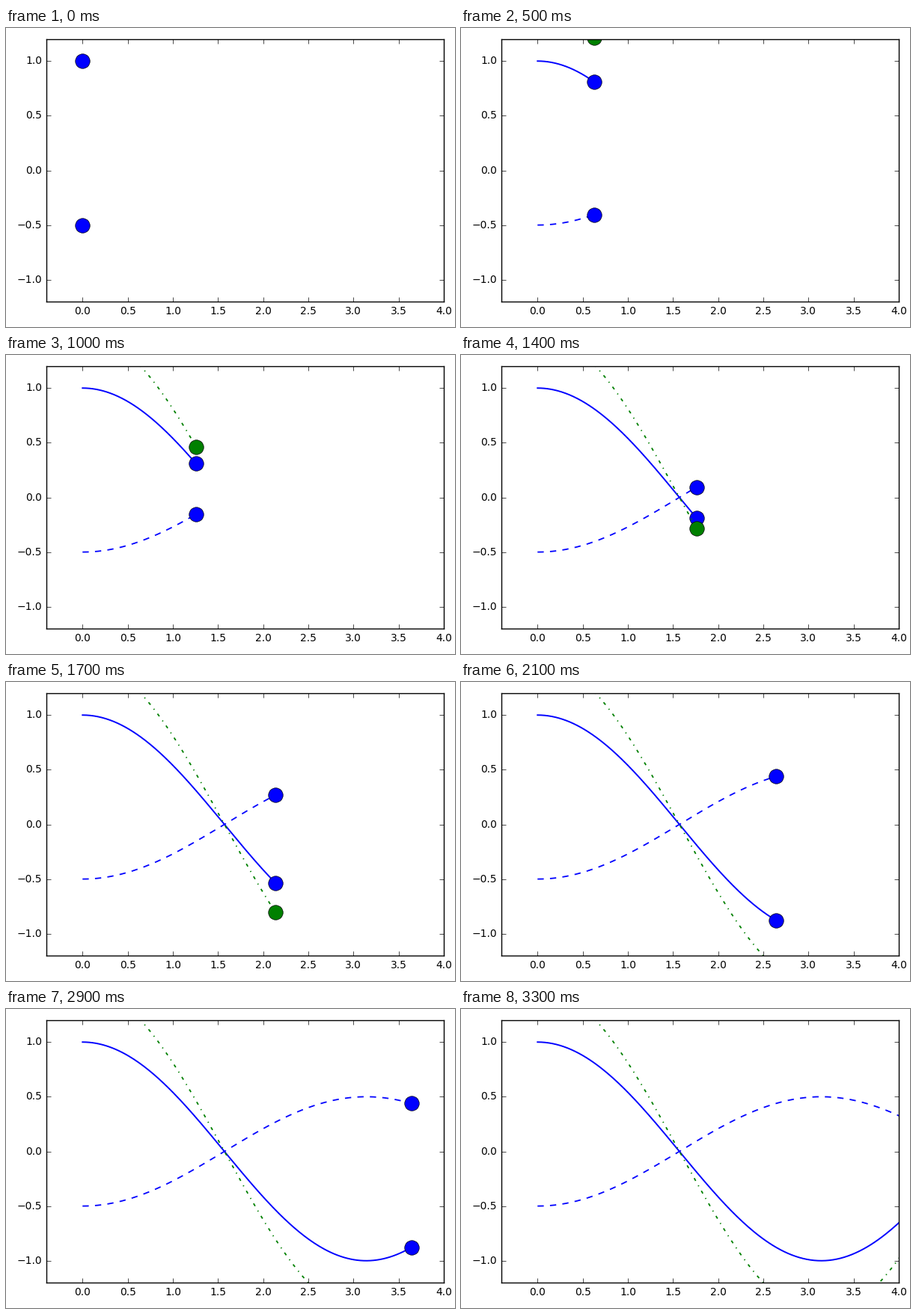
Animation of 600 by 400 pixels, one loop 5.1 s. Source, as a matplotlib script:

```python
import numpy as np
import matplotlib.pyplot as plt
from matplotlib.animation import FuncAnimation

plt.style.use("classic")
plt.rcParams.update({
    "font.family": "DejaVu Sans",
    "font.size": 10,
    "figure.dpi": 100,
    "savefig.dpi": 100,
    "figure.facecolor": "white",
})

W, H, DPI = 600, 400, 100
FRAMES, INTERVAL = 51, 100
STEP = 2 * np.pi / (FRAMES - 1)
BLUE, GREEN = (0, 0, 1), (0, 0.5, 0)

# amplitude, colour, line style of each cosine
CURVES = [(1, BLUE, "-"), (-0.5, BLUE, "--"), (1.5, GREEN, "-.")]

fig = plt.figure(figsize=(W / DPI, H / DPI), dpi=DPI)
ax = fig.add_axes([54 / W, 34 / H, 531 / W, 351 / H])
ax.set_xlim(-0.4, 4)
ax.set_ylim(-1.2, 1.2)
ax.set_xticks(np.arange(0, 4.1, 0.5))
ax.set_yticks(np.arange(-1, 1.1, 0.5))

traces = []
for amp, color, style in CURVES:
    line, = ax.plot([], [], style, color=color, lw=1.4 if style == "-" else 1.3)
    ball, = ax.plot([], [], "o", color=color, ms=14)
    traces.append((amp, line, ball))


def draw(k):
    end = k * STEP
    x = np.linspace(0, end, 200)
    artists = []
    for amp, line, ball in traces:
        line.set_data(x, amp * np.cos(x))
        ball.set_data([end], [amp * np.cos(end)])
        line.set_visible(k > 0)
        artists += [line, ball]
    return artists


anim = FuncAnimation(fig, draw, frames=FRAMES, interval=INTERVAL,
                     init_func=lambda: draw(0), repeat=True, repeat_delay=0)
plt.show()
```
